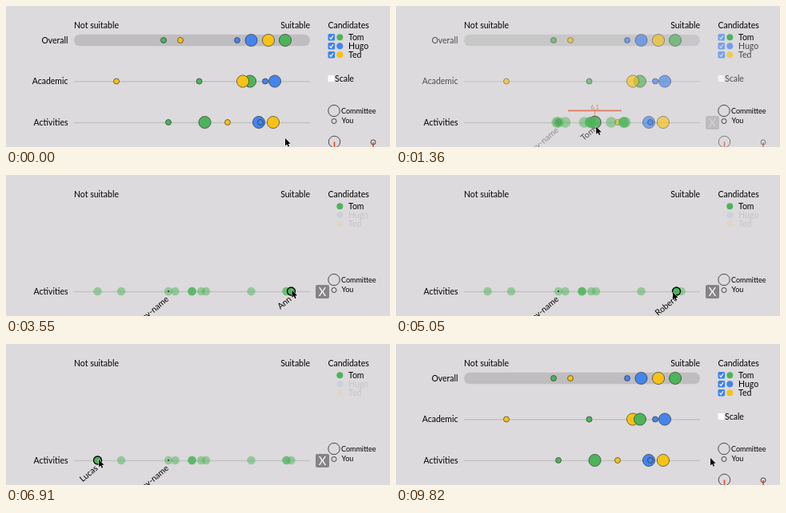
Recreate the animation shown at these times as an HTML page with a canvas. Size 480 by 177 pixels, loop 9870 ms.

```html
<!DOCTYPE html>
<html lang="en">
<head>
<meta charset="utf-8">
<title>Candidate ratings</title>
<style>
html, body { margin: 0; width: 100%; height: 100%; overflow: hidden; background: #dcdadc; }
canvas { display: block; width: 480px; height: 177px; }
</style>
</head>
<body>
<canvas id="stage"></canvas>
<script>
const canvas = document.getElementById('stage');
const ctx = canvas.getContext('2d');
const dpr = window.devicePixelRatio || 1;
canvas.width = 480 * dpr;
canvas.height = 177 * dpr;

const LOOP = 9870, OPEN = 1000, CLOSE = 9590;
const GREEN = '#4db45a', BLUE = '#4584ea', YELLOW = '#f6c216', RED = '#e0481f', LINE = '#c3c1c3';
const BIG = 7.6, SMALL = 3.5, MEMBER = 5.2;
const ROWS = { overall: 43, academic: 94.5, activities: 146 };
const MEAN = 248.5, MINE = 203;

// [row, x, radius, colour] in drawing order
const dots = [
  ['overall', 197, SMALL, GREEN], ['overall', 218, SMALL, YELLOW], ['overall', 289, SMALL, BLUE],
  ['overall', 306.5, BIG, BLUE], ['overall', 328, BIG, YELLOW], ['overall', 349, BIG, GREEN],
  ['academic', 138, SMALL, YELLOW], ['academic', 241.5, SMALL, GREEN],
  ['academic', 324, SMALL, BLUE], ['academic', 336, BIG, BLUE],
  ['activities', MINE, SMALL, GREEN], ['activities', MEAN, BIG, GREEN], ['activities', 277, SMALL, YELLOW],
  ['activities', 316, BIG, BLUE], ['activities', 318, SMALL, BLUE], ['activities', 334, BIG, YELLOW]
];
const academicPair = [['academic', 305, BIG, GREEN], ['academic', 296, BIG, YELLOW]];

// [x, name, number of stacked dots]
const members = [
  [114.5, 'Lucas', 1], [144, 'Nina', 1], [MINE, '', 1], [211.5, 'Paula', 1], [232.5, 'Erik', 3],
  [244, 'Rosa', 1], [250, 'Diana', 1], [306.5, 'Fiona', 1], [350.5, 'Robert', 2], [356.5, 'Ann', 1]
];
const legend = [['Tom', GREEN, 39.3], ['Hugo', BLUE, 50.3], ['Ted', YELLOW, 61.3]];

// pointer path: [time, x, y]
const path = [
  [90, 349, 166], [800, 250, 152], [1090, 250, 152], [2050, 251, 149], [2340, 304, 145],
  [2500, 305, 145], [2860, 348, 140], [3050, 357, 143], [4050, 358, 146], [4640, 346, 147],
  [5050, 346, 147], [5770, 306, 146], [5910, 306, 146], [6150, 270, 133], [6500, 160, 132],
  [6860, 116, 145], [6910, 116, 145], [7860, 173, 107], [8140, 250, 95], [8320, 250, 95],
  [8410, 373, 121], [8700, 396, 140], [9000, 393, 143]
];

const clamp = v => Math.max(0, Math.min(1, v));
const lerp = (a, b, u) => a + (b - a) * u;
const ease = v => { const u = clamp(v); return u * u * (3 - 2 * u); };

function pointer(t) {
  const i = path.findIndex(p => p[0] > t);
  if (i === 0) return path[0].slice(1);
  if (i < 0) return path[path.length - 1].slice(1);
  const [a, b] = [path[i - 1], path[i]];
  const u = ease((t - a[0]) / (b[0] - a[0]));
  return [lerp(a[1], b[1], u), lerp(a[2], b[2], u)];
}

function faded(alpha, draw) {
  if (alpha <= 0) return;
  ctx.save();
  ctx.globalAlpha *= alpha;
  draw();
  ctx.restore();
}

function circle(x, y, r, fill, width = 0.6, stroke = '#222') {
  ctx.beginPath();
  ctx.arc(x, y, r, 0, 2 * Math.PI);
  if (fill) { ctx.fillStyle = fill; ctx.fill(); }
  if (width) { ctx.strokeStyle = stroke; ctx.lineWidth = width; ctx.stroke(); }
}

function line(x1, y1, x2, y2, color, width) {
  ctx.beginPath();
  ctx.moveTo(x1, y1);
  ctx.lineTo(x2, y2);
  ctx.strokeStyle = color;
  ctx.lineWidth = width;
  ctx.stroke();
}

function box(x, y, w, h, r, color) {
  ctx.beginPath();
  ctx.roundRect(x, y, w, h, r);
  ctx.fillStyle = color;
  ctx.fill();
}

function text(str, x, y, size = 10.5, align = 'left', color = '#000') {
  ctx.font = `${size}px Lato, sans-serif`;
  ctx.textAlign = align;
  ctx.fillStyle = color;
  ctx.fillText(str, x, y);
}

function slanted(str, x) {
  ctx.save();
  ctx.translate(x + 1, 157);
  ctx.rotate(-40 * Math.PI / 180);
  text(str, 0, 0, 10.5, 'right');
  ctx.restore();
}

function checkbox(y) {
  box(402.5, y - 4.3, 8.6, 8.6, 1.5, '#3b82f0');
  ctx.beginPath();
  ctx.moveTo(404.6, y + 0.2);
  ctx.lineTo(406.2, y + 2);
  ctx.lineTo(409, y - 2.2);
  ctx.strokeStyle = '#fff';
  ctx.lineWidth = 1.2;
  ctx.stroke();
}

function drawFrameText() {
  text('Not suitable', 85, 28);
  text('Suitable', 380, 28, 10.5, 'right');
  text('Candidates', 402.5, 28);
  text('Activities', 77.5, 149.8, 10.5, 'right');
  line(85, 146.5, 380, 146.5, LINE, 1.6);
  circle(410, 131.5, 7.2, null, 0.8);
  text('Committee', 419, 135, 9);
  circle(410, 144.5, 3, null, 0.8);
  text('You', 419.5, 147.3, 9);
}

function drawLegend(k) {
  legend.forEach(([name, color, y], i) => {
    faded(1 - k, () => checkbox(y));
    faded(i ? 1 - 0.9 * k : 1, () => {
      circle(417.3, y, 4, color, 0);
      text(name, 428, y + 3.7);
    });
  });
}

function drawOverview(t, hover) {
  box(85, 35.7, 295, 14.6, 7.3, '#bfbdbf');
  text('Overall', 77.5, 46.7, 10.5, 'right');
  text('Academic', 77.5, 98.2, 10.5, 'right');
  line(85, 94.7, 380, 94.7, LINE, 1.6);

  box(402.5, 87, 8, 8, 1.5, '#fff');
  text('Scale', 411, 94.5);
  circle(410.5, 170.5, 7.2, null, 0.8);
  line(410.5, 170.5, 410.5, 177, RED, 1.6);
  circle(459, 171, 3, null, 0.8);
  line(459, 171, 459, 177, RED, 1.6);

  if (hover) {
    line(MEAN, 131, MEAN, 146, RED, 0.8);
    line(215, 131.3, 282, 131.3, RED, 1.8);
    text('6.1', MEAN, 130, 7.5, 'center', RED);
    slanted(legend[0][0], MEAN);
  }
  const pair = t < CLOSE ? academicPair : [...academicPair].reverse();
  for (const [row, x, r, color] of [...dots, ...pair]) {
    const chosen = hover && row === 'activities' && color === GREEN;
    circle(x, ROWS[row], r, color, chosen ? 1.3 : 0.6);
  }
}

function drawMembers(k, px, py) {
  const y = ROWS.activities;
  for (const [x, , count] of members) {
    const start = x === MINE ? MINE : MEAN;
    faded(0.5 * clamp(k * 5), () => {
      for (let i = 0; i < count; i++) {
        circle(lerp(start, x, k), y, lerp(BIG, MEMBER, k), GREEN, 0);
      }
    });
  }
  faded(k, () => {
    circle(MINE, y, 0.9, '#111', 0);
    slanted('my-name', MINE);
    box(387, 138, 17, 17, 2, '#858385');
    text('X', 395.5, 151.5, 14.5, 'center', '#fff');
  });
  if (k < 0.97) return;
  const distance = m => Math.hypot(m[0] - px, y - py);
  const near = members.reduce((a, b) => distance(b) < distance(a) ? b : a);
  if (distance(near) < 5.8) {
    circle(near[0], y, 5, GREEN, 1.3, '#000');
    slanted(near[1], near[0]);
  }
}

function drawPointer(x, y) {
  const arrow = new Path2D('M0 0V9.4L2.2 7.5L3.7 10.7L5.2 10L3.8 7L6.6 6.8Z');
  ctx.save();
  ctx.translate(x, y);
  ctx.strokeStyle = '#fff';
  ctx.lineWidth = 1;
  ctx.stroke(arrow);
  ctx.fillStyle = '#000';
  ctx.fill(arrow);
  ctx.restore();
}

function render(now) {
  const t = now % LOOP;
  const k = t < CLOSE ? ease((t - OPEN) / 900) : 1 - ease((t - CLOSE) / 210);
  const [px, py] = pointer(t);
  const hover = t < CLOSE && Math.hypot(px - MEAN, py - ROWS.activities) < 8;

  ctx.setTransform(dpr, 0, 0, dpr, 0, 0);
  ctx.fillStyle = '#dcdadc';
  ctx.fillRect(0, 0, 480, 177);
  drawFrameText();
  drawLegend(k);
  faded(1 - k, () => drawOverview(t, hover));
  if (k > 0) drawMembers(k, px, py);
  drawPointer(px, py);
}

const begin = performance.now();
function tick() {
  render(performance.now() - begin);
  requestAnimationFrame(tick);
}
tick();
</script>
</body>
</html>
```
